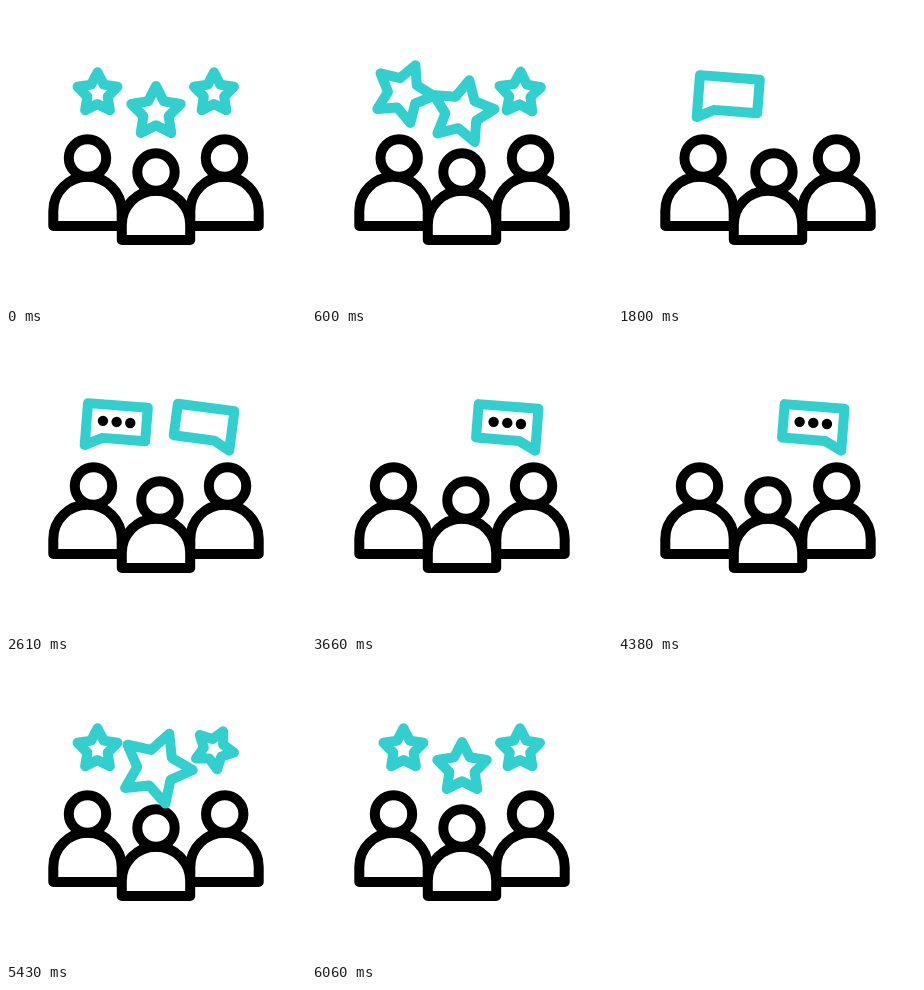
Animation of 300x300 px, one loop 6.3 s. Source, as an HTML page with a canvas:

```html
<!DOCTYPE html>
<html>
<head>
<meta charset="utf-8">
<style>
html, body { margin: 0; width: 100%; height: 100%; overflow: hidden; background: #fff; }
canvas { display: block; }
</style>
</head>
<body>
<canvas id="stage" width="300" height="300"></canvas>
<script>
const ctx = document.getElementById('stage').getContext('2d');
const TEAL = '#32cfcf', LOOP = 6300, STEP = 30, LAST = 6060, TILT = 4.5;

// Eased value at t for keys given as [time, value]
function tween(t, keys) {
  if (t <= keys[0][0]) return keys[0][1];
  for (let i = 1; i < keys.length; i++) {
    const [t0, v0] = keys[i - 1], [t1, v1] = keys[i];
    if (t < t1) return v0 + (v1 - v0) * (1 - Math.cos(Math.PI * (t - t0) / (t1 - t0))) / 2;
  }
  return keys[keys.length - 1][1];
}

function line(path, color, fill) {
  ctx.lineWidth = 10;
  ctx.lineJoin = ctx.lineCap = 'round';
  ctx.strokeStyle = color;
  if (fill) {
    ctx.fillStyle = fill;
    ctx.fill(path);
  }
  ctx.stroke(path);
}

function dot(x, y, r) {
  ctx.fillStyle = '#000';
  ctx.beginPath();
  ctx.arc(x, y, r, 0, 7);
  ctx.fill();
}

// Maps a local point to the stage; the stroke width stays constant
function placer(x, y, scale, degrees) {
  const a = degrees * Math.PI / 180, c = Math.cos(a) * scale, s = Math.sin(a) * scale;
  return (px, py) => [x + px * c - py * s, y + px * s + py * c];
}

function polygon(points) {
  const path = new Path2D();
  points.forEach(p => path.lineTo(...p));
  path.closePath();
  return path;
}

function person(t, x, y, start) {
  const phase = Math.min(3, Math.max(0, (t - start) / 1050));
  const shift = 3 * (1 - Math.cos(2 * Math.PI * phase));
  const body = new Path2D();
  body.moveTo(x - 34.2, y + 68);
  body.arc(x, y + 53, 34.2, Math.PI, 0);
  body.lineTo(x + 34.2, y + 68);
  body.closePath();
  line(body, '#000', '#fff');
  const head = new Path2D();
  head.arc(x + shift, y, 18.7, 0, 7);
  line(head, '#000', '#fff');
}

function star(t, x, y, radius, out, back) {
  const keys = (rest, peak, first) => [[out, rest], [out + 390, peak], [out + 790, 0],
    [back, first], [back + 600, peak], [back + 1005, rest]];
  const scale = tween(t, keys(1, 1.47, 0));
  if (scale < 0.01) return;
  const at = placer(x, y, scale * radius, tween(t, keys(0, 24, 33)));
  const points = [];
  for (let i = 0; i < 10; i++) {
    const a = i * Math.PI / 5, r = i % 2 ? 0.51 : 1;
    points.push(at(r * Math.sin(a), -r * Math.cos(a)));
  }
  line(polygon(points), TEAL);
}

// The bubble scales and swings about the tip of its tail
function bubble(t, x, y, side, start, end) {
  const scale = tween(t, [[start, 0], [start + 270, 1.07], [start + 390, 0.95],
    [start + 480, 1], [end, 1], [end + 200, 1.1], [end + 600, 0]]);
  if (scale < 0.01) return;
  const turn = tween(t, [[start, 0], [start + 300, 10.5], [start + 480, TILT],
    [end, TILT], [end + 300, 0]]);
  const at = placer(x, y, scale, turn);
  const shape = [[0, 0], [0, -42], [60, -42], [60, -8.5], [17, -8.5]];
  line(polygon(shape.map(([px, py]) => at(px * side, py))), TEAL);
  for (let i = 0; i < 3; i++) {
    const pop = start + 540 + 150 * i;
    const r = tween(t, [[pop, 0], [pop + 180, 5.2], [end - 60, 5.2], [end + 120, 0]]);
    const px = 30 * side + (i - 1) * 13.7;
    if (r > 0.1) dot(...at(px, -25.5), r);
  }
}

function draw(now) {
  const t = Math.min(LAST, Math.floor(now % LOOP / STEP) * STEP);
  ctx.fillStyle = '#fff';
  ctx.fillRect(0, 0, 300, 300);
  person(t, 81.5, 152, 0);
  person(t, 218.5, 152, 2345);
  person(t, 150, 166, 1245);
  star(t, 91.5, 87.3, 21, 260, 4410);
  star(t, 150, 106, 26, 395, 4740);
  star(t, 208, 87.3, 21, 530, 5070);
  bubble(t, 78.7, 111, 1, 1320, 2990);
  bubble(t, 223.2, 116.7, -1, 2220, 4570);
}

const begin = performance.now();
function frame() {
  draw(performance.now() - begin);
  requestAnimationFrame(frame);
}
frame();
</script>
</body>
</html>
```
